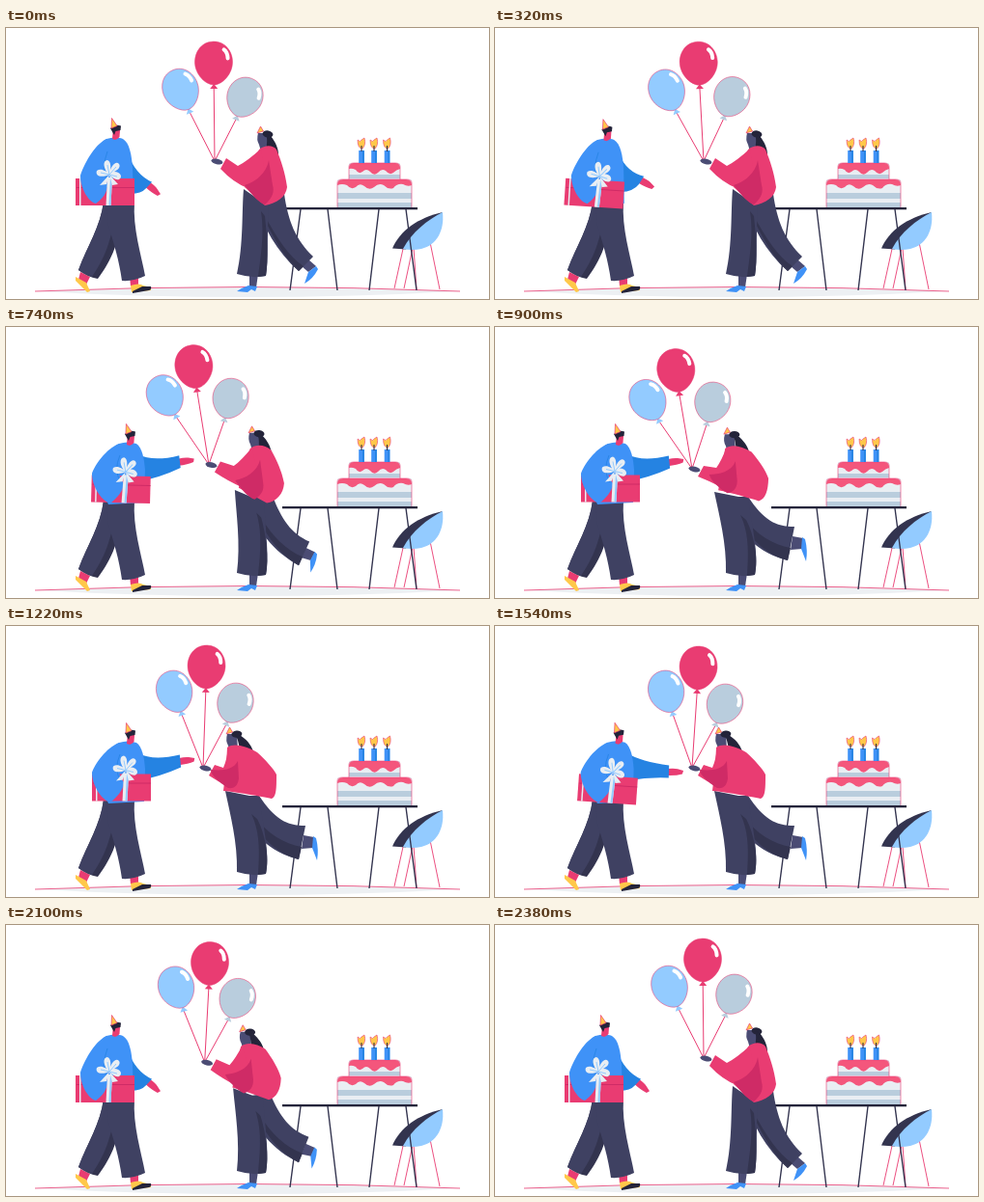
An HTML page with a canvas for the animation above (2400 ms loop, 500 by 281 pixels).

```html
<!DOCTYPE html>
<html lang="en">
<head>
<meta charset="utf-8">
<title>Birthday party</title>
<style>
  html, body { margin: 0; width: 100%; height: 100%; overflow: hidden; background: #fff; }
  canvas { display: block; width: 500px; height: 281px; }
</style>
</head>
<body>
<canvas id="stage" width="500" height="281"></canvas>
<script>
const ctx = document.getElementById('stage').getContext('2d');
const LOOP = 2400;
const C = {
  pink: '#e93c72', rose: '#cf2b66', icing: '#f4567c', blue: '#3f92f7', deepBlue: '#2583e2', sky: '#93cbff',
  steel: '#b9cddd', pale: '#e9eef3', navy: '#3f4162', dusk: '#33344f', ink: '#24243a',
  skin: '#4b4c74', yellow: '#ffc84a', white: '#ffffff'
};

// Key rows: time followed by the animated values.
// lean, box x, box y, box angle, wrist x, wrist y, wrist angle
const MAN = [
  [0, 0, 103, 170, 0, 148, 163, .75],
  [220, 0, 102, 170.5, .01, 148, 163, .75],
  [580, .92, 112, 175, .26, 172, 136, -.25],
  [780, 1, 120, 167.5, 0, 180.5, 140, -.1],
  [1360, 1, 120, 167.5, 0, 180.5, 140, -.1],
  [1540, .97, 117, 169.5, .07, 180, 151, .03],
  [1840, 0, 103, 170, 0, 148, 163, .75],
  [LOOP, 0, 103, 170, 0, 148, 163, .75]
];
// torso lean, leg swing
const WOMAN = [
  [0, 0, 0], [590, 0, 0], [900, .72, 1], [1100, 1, 1], [1880, 1, 1], [2370, 0, 0], [LOOP, 0, 0]
];
// hand, then the sky, pink and steel balloons
const BALLOONS = [
  [0, 216, 138, 181, 64, 215, 36.5, 247, 72],
  [580, 216, 138, 173, 66, 204, 37, 241, 71],
  [900, 204, 147, 158.5, 76, 187.5, 45, 225, 78],
  [1220, 204, 147, 174.5, 68, 207.5, 42.5, 237, 80],
  [1540, 204, 147, 177.5, 68, 210.5, 43.5, 237.5, 81],
  [1880, 198, 146, 173, 66, 208, 43, 233.5, 80],
  [2370, 216, 138, 181, 64, 215, 36.5, 247, 72],
  [LOOP, 216, 138, 181, 64, 215, 36.5, 247, 72]
];

// Monotone cubic interpolation through the key rows.
function sample(keys, time) {
  let i = 0;
  while (i < keys.length - 2 && time >= keys[i + 1][0]) i++;
  const rate = (n, k) => n < 0 || n > keys.length - 2 ? 0
    : (keys[n + 1][k] - keys[n][k]) / (keys[n + 1][0] - keys[n][0]);
  const slope = (n, k) => {
    const a = rate(n - 1, k), b = rate(n, k);
    return a * b > 0 ? 2 * a * b / (a + b) : 0;
  };
  const span = keys[i + 1][0] - keys[i][0];
  const s = (time - keys[i][0]) / span;
  return keys[i].slice(1).map((from, n) => {
    const k = n + 1, d = keys[i + 1][k] - from;
    return from + d * s * s * (3 - 2 * s)
      + span * s * (1 - s) * (slope(i, k) * (1 - s) - slope(i + 1, k) * s);
  });
}

const lerp = (a, b, t) => a + (b - a) * t;

// Blends two path strings that share the same commands.
function mix(a, b, t) {
  const ends = b.match(/-?[\d.]+/g);
  let i = 0;
  return a.replace(/-?[\d.]+/g, n => lerp(+n, +ends[i++], t).toFixed(2));
}

function fill(path, color) {
  ctx.fillStyle = color;
  ctx.fill(new Path2D(path));
}

function stroke(path, color, width = 1) {
  ctx.strokeStyle = color;
  ctx.lineWidth = width;
  ctx.stroke(new Path2D(path));
}

function oval(x, y, rx, ry, color, angle = 0) {
  ctx.fillStyle = color;
  ctx.beginPath();
  ctx.ellipse(x, y, rx, ry, angle, 0, Math.PI * 2);
  ctx.fill();
}

function rect(x, y, w, h, color) {
  ctx.fillStyle = color;
  ctx.fillRect(x, y, w, h);
}

function at(x, y, angle, draw) {
  ctx.save();
  ctx.translate(x, y);
  ctx.rotate(angle);
  draw();
  ctx.restore();
}

function ground() {
  fill('M30 273 Q250 264 470 273 Q250 285 30 273Z', '#edf0f3');
  stroke('M30 273 Q250 264 470 273', C.pink, .8);
}

function chair() {
  stroke('M411 229 L402 270 M421 228 L412 270 M422 228 L425 271 M439 222 L449 271', C.pink, .9);
  fill('M400 228.5 C408 210 426 197 452 191 L440 204 L414 229.500Z', C.dusk);
  fill('M452 191 C454 210 446 225 430 229 Q420 231 411 229 C420 212 436 199 452 191Z', C.sky);
}

function table() {
  stroke('M305 188 L294 272 M333 188 L343 272 M386 188 L376 272 M414 188 L425 272', C.dusk, 1.4);
  rect(286, 186, 140, 2.3, C.ink);
}

function cake() {
  rect(343, 157, 77, 29, C.pale);
  rect(343, 171, 77, 6, C.steel);
  rect(343, 181, 77, 5, C.steel);
  rect(355, 140, 53, 17, C.pale);
  rect(355, 152, 53, 4, C.steel);
  fill('M343 163 Q343 157 349 157 H414 Q420 157 420 163 Q416 165 411 162 Q405 161 401 166 Q396 168 391 163 ' +
    'Q386 160 381 165 Q376 169 371 164 Q366 160 362 165 Q357 168 353 163 Q348 161 343 163Z', C.icing);
  fill('M355 146 Q355 140 360 140 H403 Q408 140 408 146 Q404 147 401 150 Q397 153 393 148 Q389 145 385 150 ' +
    'Q381 154 377 149 Q373 145 369 149 Q365 152 362 147 Q358 145 355 146Z', C.icing);
  stroke('M343 186 V161 Q343 157 348 157 H415 Q420 157 420 161 V186 M355 157 V144 Q355 140 360 140 H403 Q408 140 408 144 V157', C.pink, .6);
  for (const x of [368, 381, 394.5]) {
    rect(x - 2.8, 127, 5.6, 13, C.blue);
    rect(x + 1, 127, 1.8, 13, C.deepBlue);
    const flame = `M${x - 4} 116 Q${x - 1} 119 ${x} 116 L${x + 3} 114 Q${x + 5} 121 ${x + 1} 125 Q${x - 4} 125 ${x - 4} 116Z`;
    fill(flame, C.yellow);
    stroke(flame, C.pink, .6);
    stroke(`M${x} 122 V128`, C.ink, 1);
  }
}

function balloon(x, y, hand, color, rx, ry) {
  const angle = Math.atan2(x - hand.x, hand.y - y) * .85;
  const knotX = x - Math.sin(angle) * (ry + 3), knotY = y + Math.cos(angle) * (ry + 3);
  stroke(`M${knotX} ${knotY} L${hand.x} ${hand.y}`, C.pink, 1);
  at(x, y, angle, () => {
    const shape = `M0 ${-ry} C${rx * .62} ${-ry} ${rx} ${-ry * .55} ${rx} ${-ry * .05} ` +
      `C${rx} ${ry * .5} ${rx * .45} ${ry} 0 ${ry} C${-rx * .45} ${ry} ${-rx} ${ry * .5} ${-rx} ${-ry * .05} ` +
      `C${-rx} ${-ry * .55} ${-rx * .62} ${-ry} 0 ${-ry}Z`;
    fill(`M0 ${ry - 1} L4 ${ry + 4} L-4 ${ry + 4}Z`, color);
    fill(shape, color);
    stroke(shape, C.pink, .5);
    ctx.lineCap = 'round';
    stroke(`M${rx * .55} ${-ry * .62} Q${rx * .74} ${-ry * .5} ${rx * .75} ${-ry * .22}`, C.white, 4);
    ctx.lineCap = 'butt';
  });
}

function womanLegs(swing) {
  const part = (a, b, color) => fill(mix(a, b, swing), color);
  fill('M252 255 L261 255 L259 269 L252 270Z', C.skin);
  fill('M239 273 Q245 269 251 267 L260 268 L258 273 L254 271 L250 274Z', C.blue);
  part('M306 247 L313 240 L321 247 L313 253Z', 'M306 231 L308 217 L319 219 L318 230Z', C.skin);
  part('M321 247 L313 253 L309 265 Q318 260 323 250Z', 'M318 218 L317 230 L322 243 Q324 232 321 220Z', C.blue);
  part('M258 180 C266 205 280 232 303 252 L318 237 C300 220 292 200 288 172Z',
    'M240 176 C248 215 275 235 303 242 L310 207 C290 207 278 200 262 176Z', C.navy);
  part('M266 195 C276 216 288 238 303 252 L308 247 C292 236 282 220 268 195Z',
    'M254 198 C264 222 284 237 303 242 L306 229 C288 226 270 215 258 198Z', C.dusk);
  part('M246 167 C244 190 246 225 239 255 Q255 260 269 257 C272 240 270 215 272 185Z',
    'M227 171 C232 195 240 225 239 255 Q255 260 269 257 C273 240 268 215 262 178Z', C.navy);
  part('M264 190 C268 215 263 240 261 258 L269 257 C272 240 270 215 268 195Z',
    'M254 195 C264 215 262 240 261 258 L269 257 C273 240 268 215 260 200Z', C.dusk);
}

function womanHead(lean) {
  at(-32 * lean, 3 * lean, 0, () => {
    fill('M261 109 Q259 116 262 121 L264 128 L272 126 L271 109Z', C.skin);
    at(268, 110, -.3 * lean, () => {
      oval(3, 0, 5.5, 3.6, C.ink, .2);
      fill('M1 0 L6 2 C11 8 14 15 14 21 Q8 24 3 18 C0 12 4 8 1 0Z', C.ink);
    });
    fill('M263.5 102 L260 109 L266.500 107Z', C.yellow);
    stroke('M263.5 102 L260 109 L266.500 107Z', C.pink, .7);
  });
}

function woman(lean, swing, hand) {
  womanLegs(swing);
  womanHead(lean);
  fill(mix('M262 126 C268 121 276 121 280 126 C285 138 289 150 291 165 C290 175 280 182 268 184 C260 178 255 172 247 165 L254 145Z',
    'M229 126 C236 121 247 124 260 131 C268 138 277 148 280 154 C280 168 280 177 275 179 C264 177 240 172 225 171 L228 145Z', lean), C.pink);
  const { x, y } = hand;
  const cuff = `L${x + 12} ${y - 3} L${x + 6} ${y + 8}`;
  fill(mix(`M264 125 Q250 138 240 143 ${cuff} Q235 160 250 166 L268 150Z`,
    `M230 125 Q229 138 225 147 ${cuff} Q218 160 228 166 L240 150Z`, lean), C.pink);
  fill(mix('M272 137 C270 150 258 160 247 163 C255 173 262 182 268 183 C276 176 278 170 276 163Z',
    'M240 140 C235 150 222 150 212 149 C212 155 222 163 230 168 C237 169 240 165 241 158Z', lean), C.rose);
  oval(x + 2.5, y + .5, 6, 2.8, C.skin, .2);
}

function manLegs() {
  fill('M77 253 L87 258 L83 266 L75 261Z', C.pink);
  fill('M72 258 L83 264 L87 273 L84 274 L72 262Z', C.yellow);
  fill('M128 257 L137 257 L137 268 L129 268Z', C.pink);
  fill('M129 267 Q138 264 142 267 L150 269 V272 L130 274Z', C.yellow);
  fill('M131 273 L141 268 L150 268 Q151 271 148 272 L131 275Z', C.ink);
  fill('M101 180 C98 206 84 226 75 251 Q84 258 95 260 C106 245 117 228 122 184Z', C.dusk);
  fill('M101 180 C98 206 84 226 75 251 Q82 256 89 258 C101 240 110 222 114 184Z', C.navy);
  fill('M104 182 L133 180 C131 208 140 235 144 257 Q132 263 120 262 C117 240 112 225 106 205Z', C.navy);
}

function bow() {
  fill('M2 -15 L7 -15 L5.500 14 L0.500 14Z', C.pale);
  fill('M5 -15 L7 -15 L5.500 14 L3.500 14Z', C.sky);
  fill('M4 -18 L-6 -7 L1 -8Z M4 -18 L13 -8 L7 -7Z', C.pale);
  fill('M4 -18 C-5 -14 -11 -17 -9 -22 C-5 -25 1 -22 4 -18 C-3 -24 -3 -33 2 -33 C6 -32 6 -24 4 -18 ' +
    'C5 -27 11 -33 14 -29 C16 -26 13 -23 9 -21 C16 -21 18 -15 14 -13 C10 -12 7 -15 4 -18Z', C.pale);
  stroke('M4 -18 L-5 -20 M4 -18 L2 -28 M4 -18 L11 -26 M4 -18 L12 -16', C.sky, 1);
}

function man(lean, boxX, boxY, boxAngle, wristX, wristY, wristAngle) {
  const body = (a, b, color) => fill(mix(a, b, lean), color);
  manLegs();

  at(wristX, wristY, wristAngle, () => {
    fill('M-2 -3 Q6 -4 9 -3 L15 -1.5 L14 2 Q8 4 -2 4Z', C.pink);
  });
  const r = lerp(4.5, 6.5, lean);
  const dx = Math.sin(wristAngle) * r, dy = Math.cos(wristAngle) * r;
  const cuff = `${wristX + dx} ${wristY - dy} L${wristX - dx} ${wristY + dy}`;
  body(`M126 130 Q134 152 ${cuff} Q140 172 129 172Z`, `M137 132 Q152 140 ${cuff} Q160 156 138 160Z`, C.deepBlue);

  body('M104 115 C110 113 116 113 121 115 C128 119 130 132 131 145 L132 182 L100 184 L86 150 C92 130 97 119 104 115Z',
    'M117 121 C123 119 129 119 135 121 C141 125 143 136 144 148 L143 182 L106 184 L95 156 C101 138 108 126 117 121Z', C.blue);

  at(15 * lean, 7 * lean, 0, () => {
    fill('M111 104 L118 106 L117.5 113 Q116 115 113 116 L110 115Z', C.pink);
    fill('M108 104 Q113 99 119 101.5 L118.5 106 L113.5 107 L112 111Z', C.ink);
    fill('M109.5 93.5 L109 104 L115 101.5Z', C.yellow);
    stroke('M109.5 93.5 L109 104 L115 101.5Z', C.pink, .7);
  });

  at(boxX, boxY, boxAngle, () => {
    rect(-31, -14, 61, 28, C.pink);
    rect(-30, -5, 60, 1, C.rose);
    rect(-27, -14, 1.5, 28, C.pale);
  });
  body('M104 115 C91 121 80 143 77 153 C77 166 85 180 93 182 C99 178 106 170 105 161 C102 156 103 150 104 140Z',
    'M117 121 C104 126 92 143 89 152 C89 164 98 180 108 183 C114 178 122 170 122 162 C117 156 116 150 117 140Z', C.blue);
  stroke(mix('M105 128 Q99 144 104 158', 'M118 133 Q111 149 119 161', lean), C.deepBlue, .8);
  at(boxX, boxY, boxAngle, bow);
}

function render(time) {
  rect(0, 0, 500, 281, C.white);
  ground();
  chair();
  table();
  cake();
  const [hx, hy, ax, ay, bx, by, cx, cy] = sample(BALLOONS, time);
  const hand = { x: hx, y: hy };
  balloon(cx, cy, hand, C.steel, 18.5, 21);
  balloon(ax, ay, hand, C.sky, 18.5, 22);
  balloon(bx, by, hand, C.pink, 19.5, 22.5);
  woman(...sample(WOMAN, time), hand);
  man(...sample(MAN, time));
}

const start = performance.now();
function tick() {
  render((performance.now() - start) % LOOP);
  requestAnimationFrame(tick);
}
tick();
</script>
</body>
</html>
```
